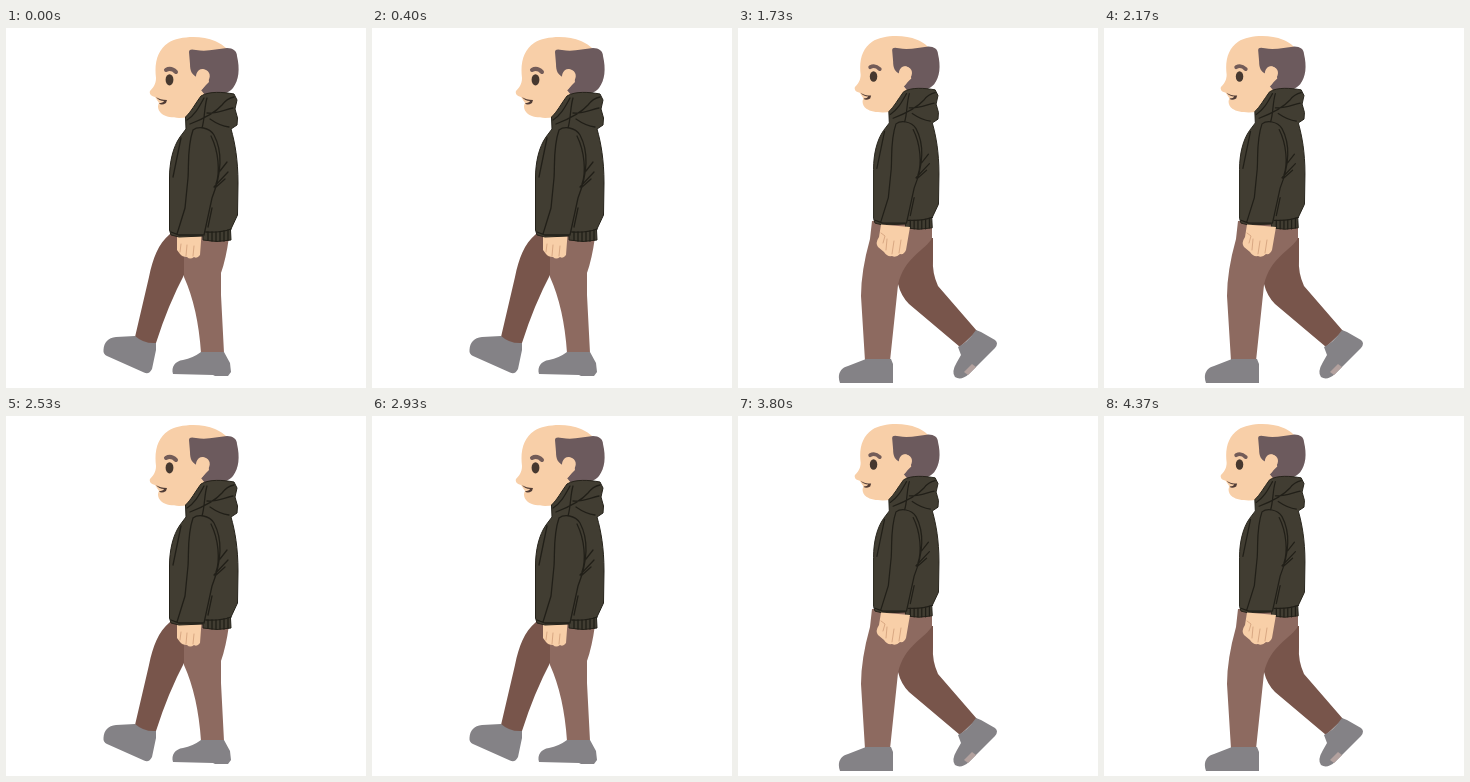
An HTML page that plays this animation: 360 px wide and 360 px high, repeating every 4410 ms.

```html
<!DOCTYPE html>
<html lang="en">
<head>
<meta charset="utf-8">
<title>Walking man</title>
<style>
  html, body { margin: 0; width: 100%; height: 100%; overflow: hidden; background: #fff; }
  svg { display: block; width: 100vw; height: 100vh; }
  .pose { animation: swap 4410ms step-end infinite; }
  .wide { animation-name: swap-back; }
  @keyframes swap {
    0% { opacity: 1; } 24.943% { opacity: 0; }
    49.887% { opacity: 1; } 74.15%, 100% { opacity: 0; }
  }
  @keyframes swap-back {
    0% { opacity: 0; } 24.943% { opacity: 1; }
    49.887% { opacity: 0; } 74.15%, 100% { opacity: 1; }
  }
  .skin { fill: #f8cfa8; }
  .hair { fill: #6c5a5d; }
  .coat { fill: #413d32; stroke: #25221a; stroke-width: 1; }
  .seam { fill: none; stroke: #211f18; stroke-width: 1.3; stroke-linecap: round; }
  .near { fill: #8d6a60; }
  .far { fill: #78554b; }
  .shoe { fill: #848286; }
  .finger { fill: none; stroke: #d9a883; stroke-width: 1; stroke-linecap: round; }
</style>
</head>
<body>
<svg viewBox="0 0 360 360">
  <defs>
    <g id="torso">
      <!-- head -->
      <path class="skin" d="M150 50C148 34 152 22 162 15C173 8 195 7 209 13C216 16 221 20 223 24L204 67L188 87C181 91 163 91 156 86C152 83 151 78 153 75L149 69C145 68 143 66 144 63C147 60 150 56 150 50Z"/>
      <path class="hair" d="M183 24C183 21 186 21 190 22C201 24 211 21 221 20C227 20 231 23 231 28C234 41 233 52 227 60C222 66 211 69 199 67L195 62L203 54L201 43C194 39 191 43 191 49C186 47 184 43 184 36Z"/>
      <path class="skin" d="M190 49C190 43 195 39 200 42C206 45 204 52 200 56C198 59 196 63 192 64Z"/>
      <ellipse cx="163.500" cy="51.800" rx="3.900" ry="5.600" fill="#46382f"/>
      <path d="M160 42Q165 39 170 44" fill="none" stroke="#735c58" stroke-width="4" stroke-linecap="round"/>
      <path d="M150 69Q154 72 161 72L160 75Q155 78 153 75Q157 75 158 73Q153 73 150 69Z" fill="#513c35"/>
      <!-- jacket -->
      <path class="coat" d="M179.500 89C185 84 189 76 195 68C203 63 217 64 228 66L231 72L229 81L231.500 90L231 97L225 101C229 115 232 132 232 155L231.500 187L224.500 202L225 212Q211 215 197 212V208L173 209L165 207L163.500 202V150C163.500 134 167 119 174 109L180 101Z"/>
      <path class="seam" d="M181 92C189 87 193 79 198 70M184 96C197 91 209 85 216 77C219 73 223 70 228 69M201 70C198 80 199 90 196 100M201 85C211 86 218 82 227 80M204 91Q214 98 223 99M187 102C192 98 203 99 208 107C218 126 215 147 206 170L198 207M187 102C181 119 183 137 182 150L179 180L171 206M175 110L167 149M205 108C213 124 214 145 210 156M222 144L208 159M219 151L209 160M221 134L214 143M206 180L202 199M165 204L173 207L197 207M200 204Q214 205 225 201"/>
      <path class="seam" d="M202 204V212M206 204V213M210 204V213M214 204V213M218 203V213M222 202V212"/>
    </g>
  </defs>

  <g class="pose">
    <path class="far" d="M164 206C152 216 147 230 143 249L129 309Q138 318 150 315Q162 277 179 245V206Z"/>
    <path class="near" d="M178 206V249Q192 280 195 325H218L215 267V245Q220 231 223 209Z"/>
    <path class="shoe" d="M97.500 322C98 314 102 310 110 309L129 308Q138 316 150 315V322L146 341Q143 347 138 344.500L101 328Q97 326 97.500 322Z"/>
    <path class="shoe" d="M167 346C165 339 169 333 177 332Q187 330 195 324H218L224 335L225 344L222 348H209L207 347Z"/>
    <path class="skin" d="M171 207H195.500L194 227Q191 231 188 229Q184 232 181 229Q176 229 174 226L171 222Z"/>
    <path class="finger" d="M175 216L174 224M181 217L180 228M188 218L187 228"/>
    <use href="#torso"/>
  </g>

  <g class="pose wide">
    <path class="far" d="M160 210H195L195 231Q194 245 200 258L239 303L222 319L171 276Q163 268 160 256Z"/>
    <path class="near" d="M134 193H194V210C188 222 166 229 160 257L152 333H127L123 268Q123 243 132 211Z"/>
    <path class="shoe" d="M102 355C99 347 102 340 110 338L128 331H153L155 336V355Z"/>
    <path class="shoe" d="M220 319Q229 315 238 302L243 304L257 312Q261 315 257 320L231 346Q223 353 217 349Q213 344 219 334L223 327Z"/>
    <path d="M226 344L234 336L238 339L230 347Z" fill="#b3a19e"/>
    <use href="#torso" transform="matrix(.955 0 0 .945 -20.6 -.5)"/>
    <path class="skin" d="M143 196.500L172 199L168 222Q166 227 162 226Q158 230 154 228Q149 229 146 224L140 219Q137 215 141 209Z"/>
    <path class="finger" d="M143 205L147 208L145 215M149 211L148 222M156 213L154 226M163 212L161 225"/>
  </g>
</svg>
</body>
</html>
```
